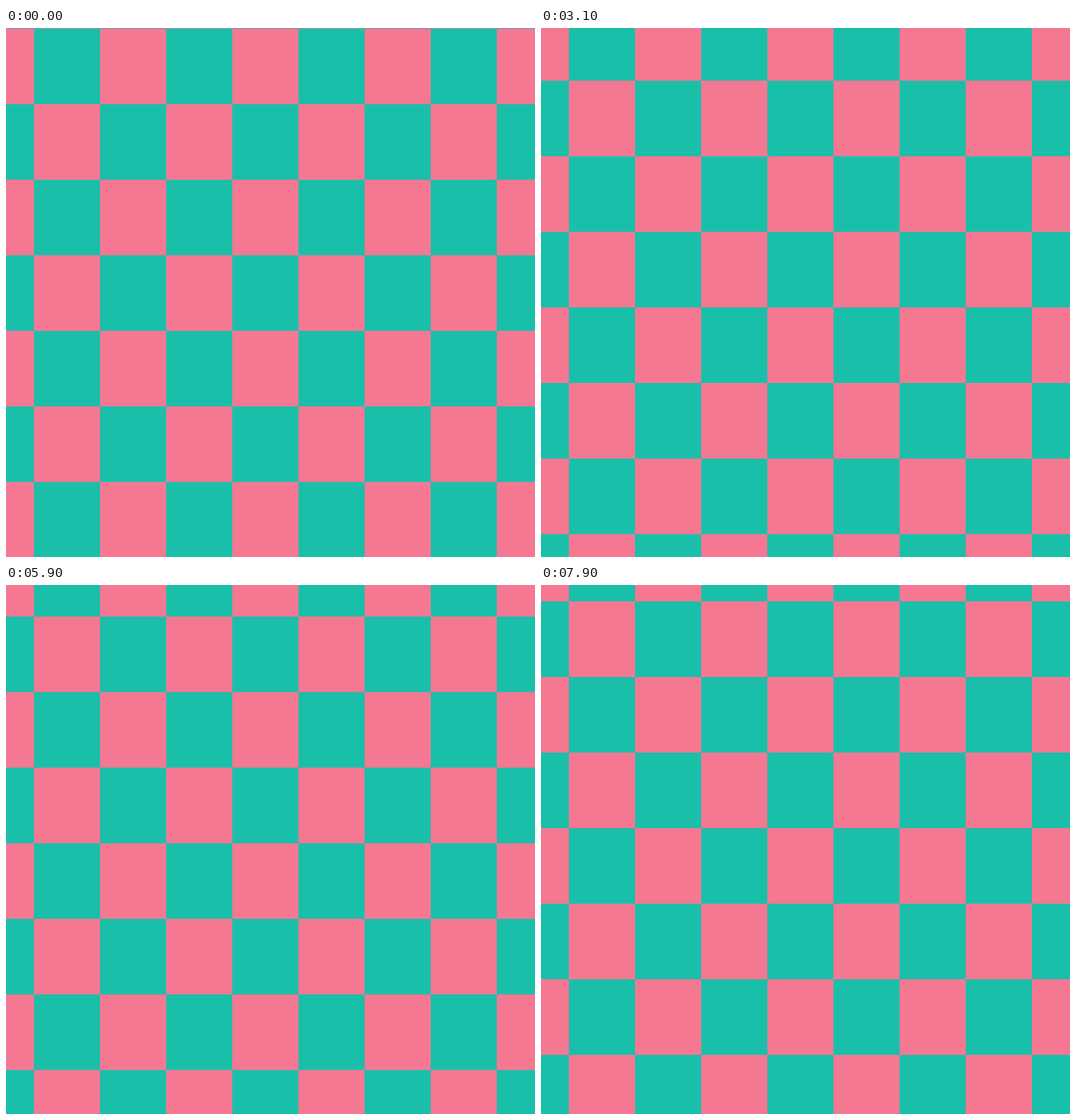
An HTML page with a canvas for the animation above (8 s loop, 748 by 748 pixels).

```html
<!DOCTYPE html>
<html lang="en">
<head>
<meta charset="utf-8">
<title>Rising checkerboard</title>
<style>
  html, body { margin: 0; width: 100%; height: 100%; overflow: hidden; background: #1abfaa; }
  canvas { display: block; width: 100%; height: 100%; }
</style>
</head>
<body>
<canvas id="stage" width="748" height="748"></canvas>
<script>
  const SIZE = 748;
  const CELL_W = SIZE / 8;
  const CELL_H = SIZE / 7;
  const LEFT = 39.5 - CELL_W;
  const TOP = 0.8;
  const LOOP = 8000;
  const STEP = 100;
  const RISE = CELL_H / 10000; // px per ms: one row in ten seconds
  const TEAL = '#1abfaa';
  const PINK = '#f57893';

  const ctx = document.getElementById('stage').getContext('2d');

  function draw(time) {
    const y0 = TOP - time * RISE;
    ctx.fillStyle = TEAL;
    ctx.fillRect(0, 0, SIZE, SIZE);
    ctx.fillStyle = PINK;
    for (let row = -1; row < 8; row++) {
      for (let col = 0; col < 9; col++) {
        if ((row + col) % 2 === 0) {
          ctx.fillRect(LEFT + col * CELL_W, y0 + row * CELL_H, CELL_W, CELL_H);
        }
      }
    }
  }

  const start = performance.now();

  function tick() {
    const elapsed = (performance.now() - start) % LOOP;
    draw(Math.floor(elapsed / STEP) * STEP);
    requestAnimationFrame(tick);
  }
  tick();
</script>
</body>
</html>
```
